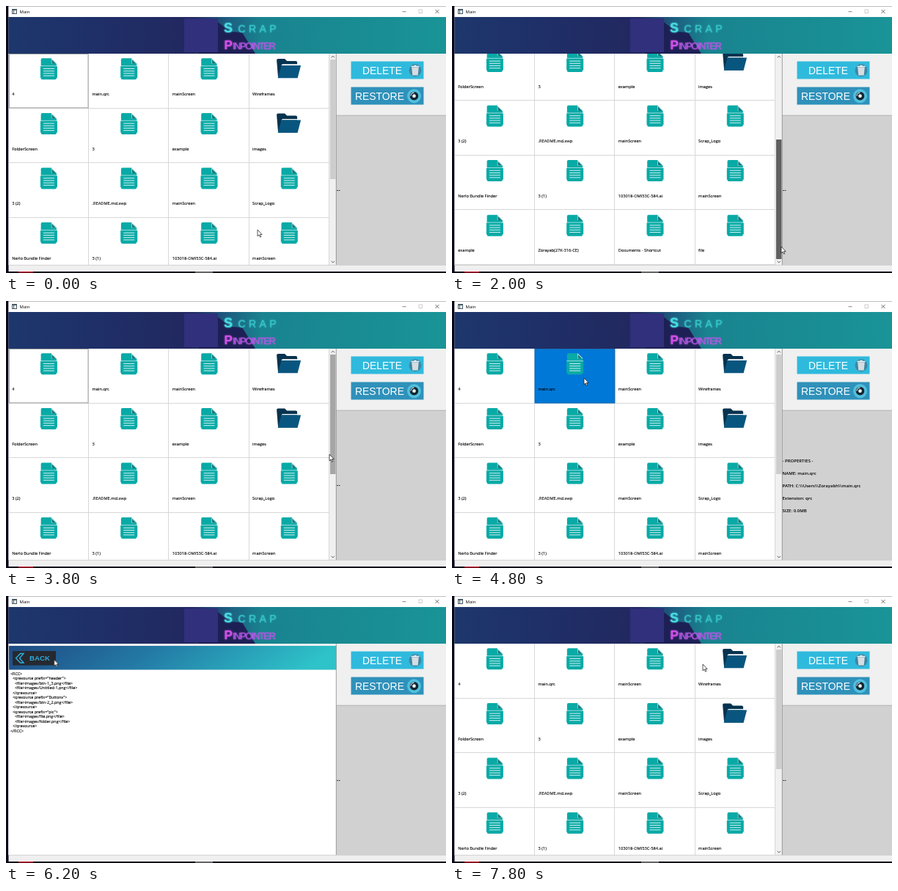
An HTML page for the animation above (8000 ms loop, 600 px wide and 364 px high).

```html
<!DOCTYPE html>
<html lang="en">
<head>
<meta charset="utf-8">
<title>Main</title>
<style>
html, body { margin: 0; width: 100%; height: 100%; overflow: hidden; background: #fff; }
svg { display: block; width: 600px; height: 364px; }
text { font-family: "Open Sans", sans-serif; fill: #000; }
.label, .code { stroke: #000; stroke-width: .12px; }
.label { font-size: 5.7px; }
.code { font-size: 5.4px; }
.props text { font-size: 6px; font-weight: 600; }
.btn { font: 13.9px "Liberation Sans", Arial, sans-serif; fill: #fff; }
.neon { font-family: "Liberation Sans", Arial, sans-serif; }
.crisp { shape-rendering: crispEdges; }

/* One 8 s clock, screen refreshed every 200 ms (2.5%) */
.anim { animation: 8s step-end infinite; }
#cursor { animation-name: cursor; }
#rows { animation-name: rows; }
#thumb { animation-name: thumb; }
#focus { animation-name: focus; }
#picked, #marked { animation-name: picked; }
#dash { animation-name: dash; }
#reader { animation-name: reader; }
#pressed { animation-name: pressed; }
#controls { animation-name: controls; }

@keyframes cursor {
  0% { transform: translate(343px, 305px); }
  5% { transform: translate(343px, 305px); animation-timing-function: steps(4); }
  15% { transform: translate(472px, 240px); animation-timing-function: steps(2); }
  20% { transform: translate(447px, 215px); }
  22.5% { transform: translate(448px, 265px); }
  25% { transform: translate(449px, 328px); animation-timing-function: steps(2); }
  30% { transform: translate(446px, 325px); }
  32.5% { transform: translate(446px, 325px); animation-timing-function: steps(5); }
  45% { transform: translate(446px, 212px); }
  47.5% { transform: translate(441px, 209px); animation-timing-function: steps(4); }
  57.5% { transform: translate(182px, 107px); }
  60% { transform: translate(180px, 105px); }
  67.5% { transform: translate(180px, 105px); animation-timing-function: steps(5); }
  80% { transform: translate(37px, 82px); }
  82.5% { transform: translate(32px, 84px); }
  87.5% { transform: translate(32px, 84px); animation-timing-function: steps(4); }
  97.5%, 100% { transform: translate(342px, 93px); }
}
@keyframes rows {
  0%, 20% { transform: translateY(0); }
  22.5% { transform: translateY(-39px); }
  25% { transform: translateY(-85px); }
  32.5% { transform: translateY(-85px); animation-timing-function: steps(5); }
  45%, 100% { transform: translateY(0); }
}
@keyframes thumb {
  0% { transform: translateY(0); fill: #cdcdcd; }
  20% { transform: translateY(0); fill: #a6a6a6; }
  22.5% { transform: translateY(50px); fill: #606060; }
  25% { transform: translateY(109px); fill: #606060; }
  32.5% { transform: translateY(109px); fill: #606060; animation-timing-function: steps(5); }
  45% { transform: translateY(0); fill: #606060; }
  47.5% { transform: translateY(0); fill: #a6a6a6; }
  50%, 100% { transform: translateY(0); fill: #cdcdcd; }
}
@keyframes focus { 0% { opacity: 1; } 57.5%, 100% { opacity: 0; } }
@keyframes picked { 0% { opacity: 0; } 57.5% { opacity: 1; } 67.5%, 100% { opacity: 0; } }
@keyframes dash { 0% { opacity: 1; } 57.5% { opacity: 0; } 67.5%, 100% { opacity: 1; } }
@keyframes reader { 0% { opacity: 0; } 67.5% { opacity: 1; } 90%, 100% { opacity: 0; } }
@keyframes pressed { 0% { opacity: 0; } 87.5% { opacity: 1; } 90%, 100% { opacity: 0; } }
@keyframes controls { 0% { opacity: 1; } 67.5% { opacity: .5; } 72.5%, 100% { opacity: 1; } }
</style>
</head>
<body>
<svg viewBox="0 0 600 364" xmlns="http://www.w3.org/2000/svg">
  <defs>
    <linearGradient id="banner">
      <stop offset="0" stop-color="#1d376c"/>
      <stop offset=".2" stop-color="#1f2f68"/>
      <stop offset=".42" stop-color="#22285f"/>
      <stop offset=".5" stop-color="#1d5d80"/>
      <stop offset=".58" stop-color="#19838f"/>
      <stop offset="1" stop-color="#199497"/>
    </linearGradient>
    <linearGradient id="bar" x2="1" y2=".1">
      <stop offset="0" stop-color="#1f4a84"/>
      <stop offset=".45" stop-color="#2379a5"/>
      <stop offset="1" stop-color="#2ec3c9"/>
    </linearGradient>
    <clipPath id="view"><path d="M4 65H441V353H4Z"/></clipPath>
    <filter id="glow" x="-20%" y="-40%" width="140%" height="180%">
      <feGaussianBlur stdDeviation="1.3" result="b"/>
      <feMerge><feMergeNode in="b"/><feMergeNode in="SourceGraphic"/></feMerge>
    </filter>
    <g id="doc">
      <path d="M2.5 0H15L22 7V27Q22 29 20 29H2.5Q.7 29 .7 27V2Q.7 0 2.5 0Z" fill="#08aaa6"/>
      <path d="M15 0L22.3 7.3H15Z" fill="#f4fbfb"/>
      <path d="M15.5 1.5L21.5 7.5H16.5Q15.5 7.5 15.5 6.5Z" fill="#0d7f80"/>
      <path d="M0 10.8H23V26.5H0Z" fill="#08aaa6"/>
      <path d="M0 10.4H23" stroke="#d5f1f0" stroke-width=".7"/>
      <path d="M4 14.2H19M4 17.4H19M4 20.6H19M4 23.8H19" stroke="#e8fafa" stroke-width=".9"/>
    </g>
    <g id="dir">
      <path d="M0 2Q0 0 2 0H11L14 3H26Q28 3 28 5V26H2Z" fill="#07334f"/>
      <path d="M6 9L8 7.3H28.6V9Z" fill="#fff"/>
      <path d="M6.5 9H33L28.5 26.2H1.5Z" fill="#08567f"/>
    </g>
  </defs>

  <!-- Window -->
  <rect width="600" height="364" fill="#08081a"/>
  <path d="M17 362.5H37" stroke="#c8202c" stroke-width="2"/>
  <path d="M258 363H282" stroke="#666" stroke-width="2"/>
  <rect x="3.5" y=".5" width="596.5" height="361.5" fill="#f0f0f0"/>
  <rect x="3.5" y=".5" width="596.5" height="14.5" fill="#fff"/>
  <g id="controls" class="anim">
    <rect x="8.5" y="4.5" width="6" height="6" fill="#f4f6f7" stroke="#4a5a66"/>
    <path d="M8.5 5.5H14.5M10.5 5V10.5" stroke="#4a5a66"/>
    <text x="18.5" y="10" font-size="6">Main</text>
    <path d="M540.5 7.7H545.5" stroke="#333" stroke-width=".6"/>
    <path d="M585.5 5L590.5 10M590.5 5L585.5 10" stroke="#333" stroke-width=".7"/>
  </g>
  <rect x="563" y="5" width="4.6" height="4.6" fill="none" stroke="#c4c4c4" stroke-width=".8"/>

  <!-- Banner -->
  <rect x="3.5" y="15" width="596.5" height="50" fill="url(#banner)"/>
  <path d="M289 22L306 35L322 36L340 65H262Z" fill="#1d2055"/>
  <rect x="243" y="17" width="46" height="46" fill="#30307c"/>
  <g filter="url(#glow)" font-weight="bold">
    <text class="neon" x="297" y="35.5" font-size="18" style="fill:#48dce0">S</text>
    <text class="neon" x="316.5" y="35.5" font-size="14" font-weight="400" letter-spacing="4.4" style="fill:#38c8cc">CRAP</text>
    <text class="neon" x="297.5" y="59" font-size="17" style="fill:#d24fe8">P</text>
    <text class="neon" x="309" y="59" font-size="13" font-weight="400" letter-spacing="-1.5" style="fill:#b558e4">INPOINTER</text>
  </g>

  <!-- File list -->
  <rect x="3.5" y="65" width="446.5" height="288" fill="#fff"/>
  <g clip-path="url(#view)"><g id="rows" class="anim"></g></g>
  <rect x="441" y="65" width="9" height="288" fill="#f0f0f0"/>
  <rect id="thumb" class="anim" x="442" y="73" width="7.5" height="163" fill="#cdcdcd"/>
  <path d="M443.7 70.3L445.8 68.2L447.9 70.3M443.7 347.8L445.8 349.9L447.9 347.8" fill="none" stroke="#555"/>

  <!-- File reader -->
  <g id="reader" class="anim">
    <rect x="3.5" y="65" width="447" height="288" fill="#f0f0f0"/>
    <rect x="4" y="68" width="446.5" height="32.5" fill="url(#bar)"/>
    <rect x="3.5" y="101" width="446.5" height="252" fill="#fff"/>
    <rect x="9" y="75" width="59" height="19.5" fill="#26292f"/>
    <g id="pressed" class="anim">
      <rect x="8" y="74" width="61" height="21" fill="#17191e"/>
      <rect x="8.5" y="74.5" width="60" height="20" fill="none" stroke="#e4e4e4"/>
      <path d="M9.5 94V75.5H68" fill="none" stroke="#000"/>
    </g>
    <path d="M19.5 78.5L13.5 84.8L19.5 91H24L18.5 84.8L24 78.5Z" fill="none" stroke="#2fb4e4" stroke-width="1.3"/>
    <text class="neon" x="32" y="88.3" font-size="9.7" font-weight="bold" style="fill:#2fa8d8">BACK</text>
    <g id="lines"></g>
  </g>

  <!-- Side panel -->
  <rect x="450" y="149" width="150" height="204" fill="#d2d1d2"/>
  <path d="M450 149.2H600" stroke="#b4b4b4"/>
  <path d="M450.3 65V353" stroke="#8c8c8c" stroke-width=".8"/>
  <path d="M3.5 353.3H600" stroke="#c4c4c4" stroke-width=".7"/>
  <rect x="470.5" y="75.5" width="99" height="24" fill="#2fbadd"/>
  <text class="btn" x="486" y="92.7">DELETE</text>
  <circle cx="558" cy="87.7" r="8.5" fill="#3f86a3"/>
  <path d="M553.2 83.5H562.8L561.7 94.5H554.3Z" fill="#d5dde2"/>
  <path d="M552.5 82.5H563.5M556.5 81.3H559.5" stroke="#eef3f5" stroke-width="1.3"/>
  <rect x="470.5" y="110.5" width="99" height="24" fill="#2f91ba"/>
  <text class="btn" x="476" y="127.7">RESTORE</text>
  <circle cx="556.5" cy="122.7" r="9.5" fill="#50c0de"/>
  <circle cx="556.5" cy="122.7" r="5.8" fill="#14242f"/>
  <path d="M552 122.7A4.5 4.5 0 0 1 556.5 118.2" fill="none" stroke="#cfeaf3" stroke-width="1.2"/>
  <circle cx="556.5" cy="122.7" r="2.4" fill="#e8f4f8"/>
  <path id="dash" class="anim" d="M451.2 251.5H453M453.7 251.5H455.5" stroke="#222" stroke-width=".9"/>
  <g id="picked" class="anim props"></g>

  <path id="cursor" class="anim" d="M0 0V8.8L2 7L3.5 10.2L4.9 9.5L3.4 6.5H6.1Z" fill="#fff" stroke="#111" stroke-width=".7"/>
</svg>
<script>
const CELL_W = 109.3, CELL_H = 74.6;
const names = [
  '4', 'main.qrc', 'mainScreen', 'Wireframes',
  'FolderScreen', '3', 'example', 'images',
  '3 (2)', '.README.md.swp', 'mainScreen', 'Scrap_Logo',
  'Nerlo Bundle Finder', '3 (1)', '103018-OMI53C-584.ai', 'mainScreen',
  'example', 'Zorayab(27K-316-CE)', 'Documents - Shortcut', 'file'
];
const folders = ['Wireframes', 'images'];
const source = `<RCC>
  <qresource prefix="header">
    <file>images/btn-1_3.png</file>
    <file>images/Untitled-1.png</file>
  </qresource>
  <qresource prefix="Buttons">
    <file>images/btn-2_2.png</file>
  </qresource>
  <qresource prefix="pic">
    <file>images/file.png</file>
    <file>images/folder.png</file>
  </qresource>
</RCC>`;
const props = [
  '- PROPERTIES -', 'NAME: main.qrc',
  'PATH: C:\\\\Users\\\\Zorayabh\\\\main.qrc',
  'Extension: qrc', 'SIZE: 0.0MB'
];

const $ = id => document.getElementById(id);
const esc = s => s.replace(/</g, '&lt;');
const text = (x, y, s, cls = '') => `<text class="${cls}" x="${x}" y="${y}">${esc(s)}</text>`;
const cellX = i => 3.7 + i % 4 * CELL_W;
const cellY = i => 65 + Math.floor(i / 4) * CELL_H;

function grid(_, i) {
  const right = Math.round(cellX(i) + CELL_W) - .5;
  const bottom = Math.round(cellY(i) + CELL_H) - .5;
  return `<path class="crisp" d="M${right - CELL_W} ${bottom}H${right}v${-CELL_H}" fill="none" stroke="#d8d8d8"/>`;
}

function cell(name, i) {
  const x = cellX(i), y = cellY(i);
  const icon = folders.includes(name)
    ? `<use href="#dir" x="${x + 37.5}" y="${y + 7}"/>`
    : `<use href="#doc" x="${x + 43.2}" y="${y + 6.3}"/>`;
  return icon + text(x + 4.5, y + 57, name, 'label');
}

$('rows').innerHTML = names.map(grid).join('')
  + '<rect id="focus" class="anim" x="4.5" y="65.5" width="107.5" height="73.3" fill="none" stroke="#a2a2a2"/>'
  + '<g id="marked" class="anim"><rect x="112.5" y="65" width="110" height="74.5" fill="#0078d7"/>'
  + '<rect x="113.5" y="65.5" width="108" height="73.5" fill="none" stroke="#3a5f80" stroke-dasharray="1"/></g>'
  + names.map(cell).join('');

$('lines').innerHTML = source.split('\n').map((line, i) => {
  const indent = line.search(/\S/);
  return text(6 + indent * 1.5, 107.8 + i * 6.5, line.trim(), 'code');
}).join('');

$('picked').innerHTML = props.map((s, i) => text(450.5, 220.2 + i * 17, s)).join('');
</script>
</body>
</html>
```
